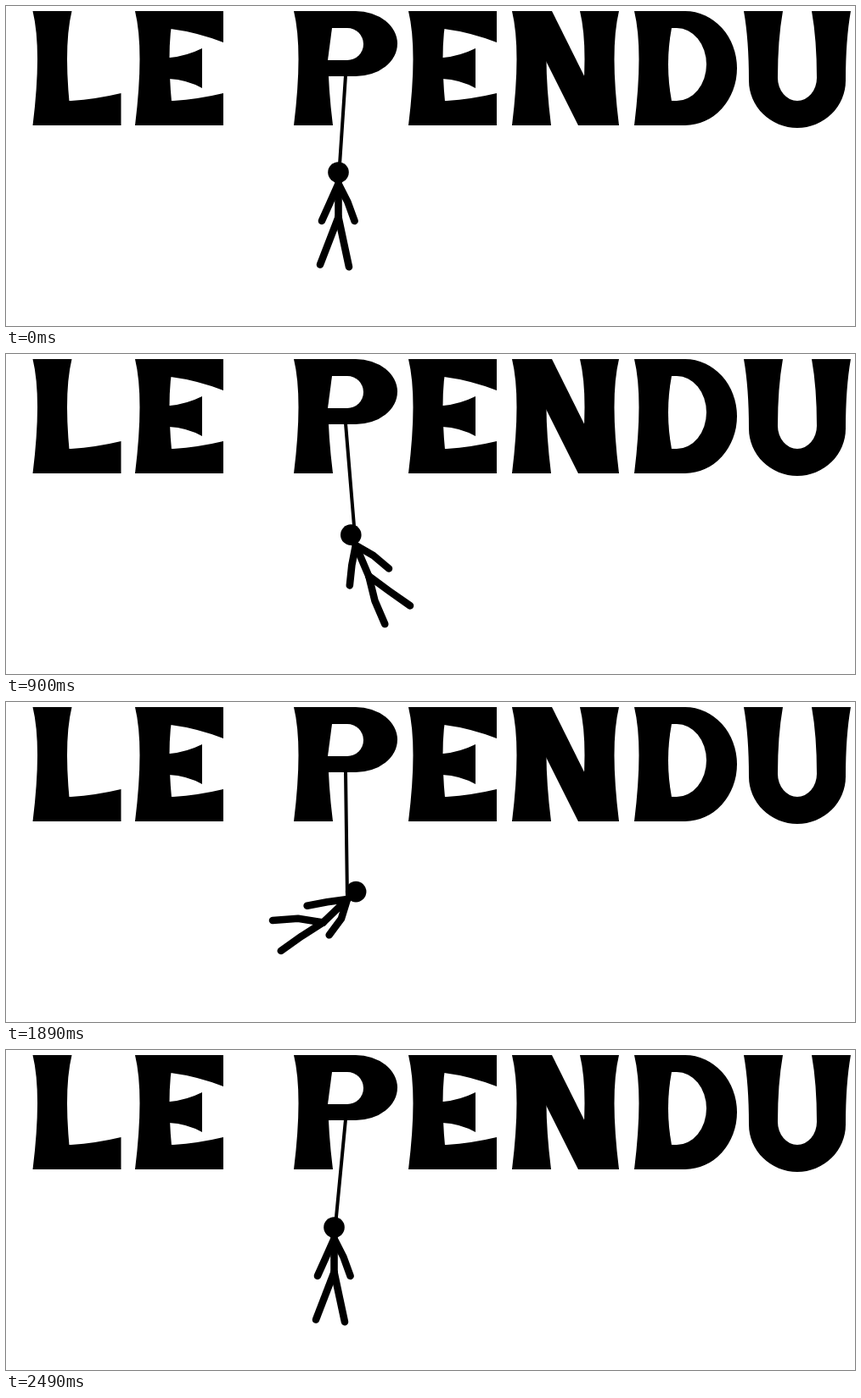
These frames come from a looping animation (1000 by 378 pixels, 2.52 s). An HTML page with a canvas:

```html
<!DOCTYPE html>
<html lang="fr">
<head>
<meta charset="utf-8">
<title>Le pendu</title>
<style>
  html, body { margin: 0; width: 100%; height: 100%; overflow: hidden; background: #fff; }
  canvas { display: block; width: 1000px; height: 378px; }
</style>
</head>
<body>
<canvas id="stage" width="1000" height="378"></canvas>
<script>
const ctx = document.getElementById('stage').getContext('2d');
const LOOP = 2520, STEP = 30;
const TOP = 6, BASE = 141, MID = (TOP + BASE) / 2, STEM = 46;
const ARM = 24, LEG = 30, TORSO = 39.5, NECK = 13.5, HEAD = 12.3;

// Angles from straight down: torso, then upper and lower part of each arm and leg
const REST = [0, -24, -24, 27, 20, -21, -21, 12, 12];
const RIGHT = [37, -3, 5, 80, 68, 35, 50, 79, 81];
const LEFT = [-49, -86, -83, -20, -40, -104, -90, -62, -59];

const swingKeys = [[0, 0], [555, 1], [1380, 0], [1980, -1], [2490, 0]];
const neckKeys = [
  [0, 391.5, 210], [450, 411, 216], [850, 412.5, 226], [1290, 395, 225],
  [1890, 402, 233], [2280, 379, 227], [2490, 386.5, 223]
];

const mix = (a, b, u) => a + (b - a) * u;

function tween(keys, t) {
  const i = Math.max(1, keys.findIndex(k => k[0] >= t));
  const a = keys[i - 1], b = keys[i];
  const u = (t - a[0]) / (b[0] - a[0]), eased = u * u * (3 - 2 * u);
  return a.slice(1).map((v, n) => mix(v, b[n + 1], eased));
}

function shape(color, draw) {
  ctx.fillStyle = color;
  ctx.beginPath();
  draw();
  ctx.fill();
}

const ink = draw => shape('#000', draw);
const hole = draw => shape('#fff', draw);

// Upright with both sides pinched at the waist
function stem(x) {
  ink(() => {
    ctx.moveTo(x, TOP);
    ctx.lineTo(x + STEM, TOP);
    ctx.quadraticCurveTo(x + STEM - 11, 52, x + STEM, BASE);
    ctx.lineTo(x, BASE);
    ctx.quadraticCurveTo(x + 11, 52, x, TOP);
  });
}

// Half oval opening to the left, closed by a straight side at x
function bowl(x, cx, cy, rx, ry) {
  ctx.moveTo(x, cy - ry);
  ctx.ellipse(cx, cy, rx, ry, 0, -Math.PI / 2, Math.PI / 2);
  ctx.lineTo(x, cy + ry);
}

function foot(x) {
  ink(() => {
    ctx.moveTo(x + 20, 112);
    ctx.lineTo(x + 45, 112);
    ctx.quadraticCurveTo(x + 75, 110, x + 104, 103);
    ctx.lineTo(x + 104, BASE);
    ctx.lineTo(x + 20, BASE);
  });
}

function letterL(x) {
  stem(x);
  foot(x);
}

function letterE(x) {
  letterL(x);
  ink(() => {
    ctx.moveTo(x + 20, TOP);
    ctx.lineTo(x + 104, TOP);
    ctx.lineTo(x + 104, 43);
    ctx.quadraticCurveTo(x + 73, 31, x + 42, 27);
    ctx.lineTo(x + 20, 27);
  });
  ink(() => {
    ctx.moveTo(x + 20, 61);
    ctx.lineTo(x + 41, 61);
    ctx.quadraticCurveTo(x + 61, 59, x + 79, 50);
    ctx.lineTo(x + 79, 97);
    ctx.quadraticCurveTo(x + 61, 87, x + 40, 86);
    ctx.lineTo(x + 20, 86);
  });
}

function letterP(x) {
  stem(x);
  ink(() => bowl(x + 20, x + 73, 44.5, 49, 38.5));
  hole(() => {
    bowl(x + 45, x + 63, 45, 19, 19);
    ctx.lineTo(x + 40, 64);
  });
}

function letterN(x) {
  stem(x);
  stem(x + 80);
  ink(() => {
    ctx.moveTo(x + 14, TOP);
    ctx.lineTo(x + 47, TOP);
    ctx.lineTo(x + 114, BASE);
    ctx.lineTo(x + 78, BASE);
    ctx.lineTo(x + 29, 43);
  });
}

function letterD(x) {
  stem(x);
  ink(() => bowl(x + 20, x + 60, MID, 61, BASE - MID));
  hole(() => {
    bowl(x + 44, x + 50, 69, 35, 43);
    ctx.quadraticCurveTo(x + 36, 69, x + 44, 26);
  });
}

function letterU(x) {
  const c = x + 63;
  ink(() => {
    ctx.moveTo(c - 63, TOP);
    ctx.quadraticCurveTo(c - 57, 40, c - 57, 88);
    ctx.ellipse(c, 88, 57, 56, 0, Math.PI, 0, true);
    ctx.quadraticCurveTo(c + 57, 40, c + 63, TOP);
    ctx.lineTo(c + 17, TOP);
    ctx.quadraticCurveTo(c + 23, 40, c + 23, 85);
    ctx.ellipse(c, 85, 23, 27, 0, 0, Math.PI);
    ctx.quadraticCurveTo(c - 23, 40, c - 17, TOP);
  });
}

function drawTitle() {
  letterL(31.5);
  letterE(152);
  letterP(339);
  letterE(474);
  letterN(596);
  letterD(740);
  letterU(869);
}

function reach([x, y], angle, length) {
  const r = angle * Math.PI / 180;
  return [x + Math.sin(r) * length, y + Math.cos(r) * length];
}

function line(width, ...points) {
  ctx.lineWidth = width;
  ctx.beginPath();
  points.forEach(p => ctx.lineTo(...p));
  ctx.stroke();
}

function limb(from, upper, lower, length) {
  const joint = reach(from, upper, length);
  line(8.6, from, joint, reach(joint, lower, length));
}

function drawFigure(t) {
  const [swing] = tween(swingKeys, t);
  const side = swing > 0 ? RIGHT : LEFT;
  const [torso, la, lb, ra, rb, lc, ld, rc, rd] =
    REST.map((a, n) => mix(a, side[n], Math.abs(swing)));
  const neck = tween(neckKeys, t);
  const hip = reach(neck, torso, TORSO);
  const head = reach(neck, torso * 1.06, -NECK);
  line(4, [400, 82], neck);
  line(8.6, neck, hip);
  limb(neck, la, lb, ARM);
  limb(neck, ra, rb, ARM);
  limb(hip, lc, ld, LEG);
  limb(hip, rc, rd, LEG);
  ink(() => ctx.arc(...head, HEAD, 0, 2 * Math.PI));
}

const start = performance.now();

function frame() {
  const t = (performance.now() - start) % LOOP;
  ctx.fillStyle = '#fff';
  ctx.fillRect(0, 0, 1000, 378);
  ctx.strokeStyle = '#000';
  ctx.lineCap = ctx.lineJoin = 'round';
  drawTitle();
  drawFigure(Math.floor(t / STEP) * STEP);
  requestAnimationFrame(frame);
}
frame();
</script>
</body>
</html>
```
